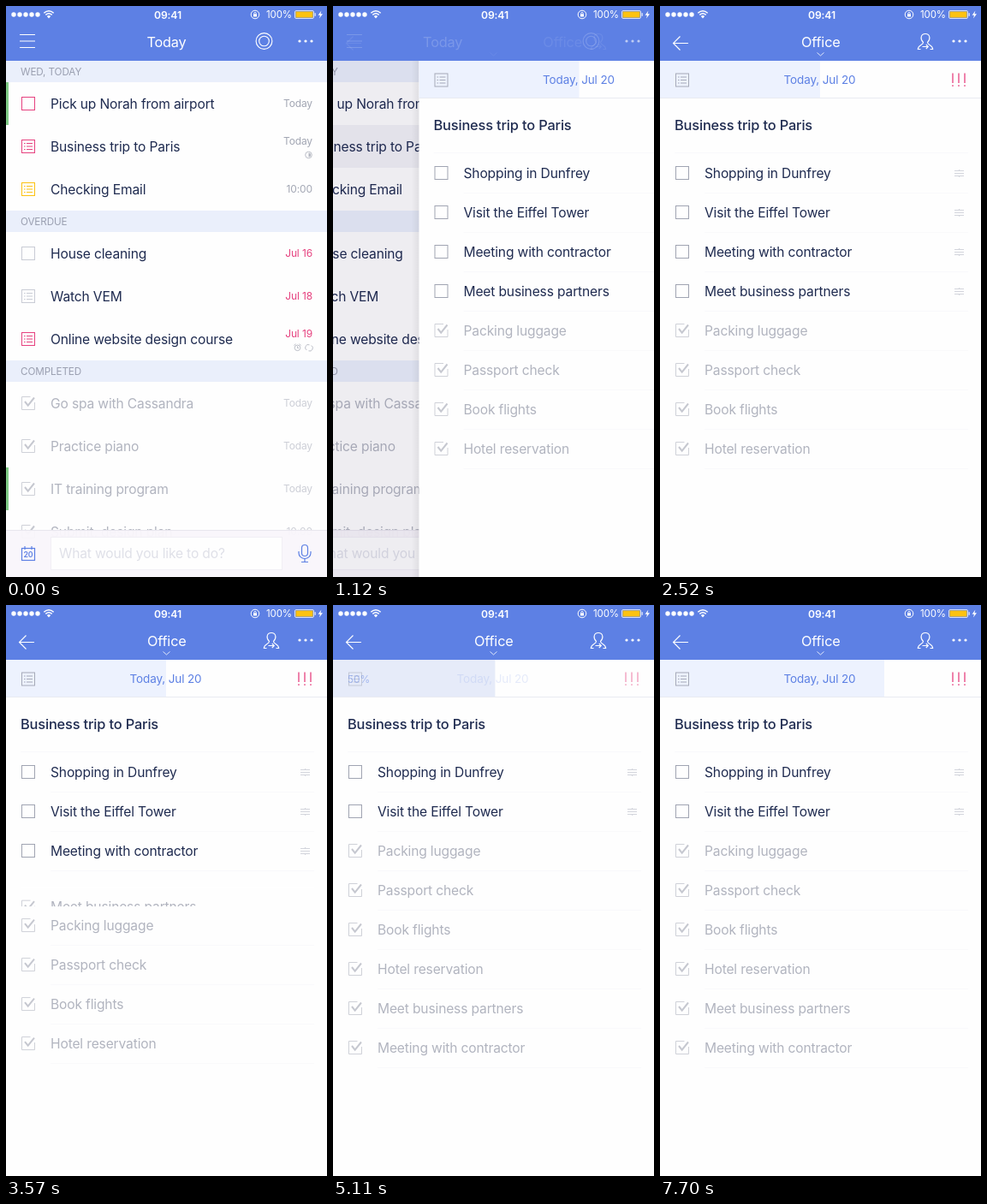
An HTML page that plays this animation: 375x667 px, repeating every 8 s.

```html
<!DOCTYPE html>
<html lang="en">
<head>
<meta charset="utf-8">
<title>To-do list</title>
<style>
html, body { margin: 0; width: 100%; height: 100%; overflow: hidden; background: #fff; }
svg { display: block; width: 100%; height: 100%; }
text { font-family: Inter, Roboto, sans-serif; font-size: 15.6px; letter-spacing: -.01em; white-space: pre; }
</style>
</head>
<body>
<svg id="stage" viewBox="0 0 375 667"></svg>
<script>
const LOOP = 8000;
const BLUE = '#5d80e4', INK = '#1f2b50', GREY = '#b1b4bf', PINK = '#e6417f', GOLD = '#fcc211';

const clamp = v => Math.max(0, Math.min(1, v));
const ramp = (t, from, to) => clamp((t - from) / (to - from));
const smooth = u => u * u * (3 - 2 * u);

// Markup helpers; text is centred vertically on y
const text = (x, y, s, fill = INK, size = 15.6, more = '') =>
  `<text x="${x}" y="${y + size * .36}" fill="${fill}" style="font-size:${size}px" ${more}>${s}</text>`;
const rect = (x, y, w, h, fill, more = '') =>
  `<rect x="${x}" y="${y}" width="${w}" height="${h}" fill="${fill}" ${more}/>`;
const line = (d, color, w = 1, more = '') =>
  `<path d="${d}" fill="none" stroke="${color}" stroke-width="${w}" ${more}/>`;
const dot = (x, y, r, fill) => `<circle cx="${x}" cy="${y}" r="${r}" fill="${fill}"/>`;
const ring = (x, y, r, color, w = 1) =>
  `<circle cx="${x}" cy="${y}" r="${r}" fill="none" stroke="${color}" stroke-width="${w}"/>`;
const END = 'text-anchor="end"', MID = 'text-anchor="middle"';

const box = (y, color) => rect(18.5, y - 7.5, 15, 15, 'none', `stroke="${color}"`);
const listIcon = (y, color) => box(y, color) + [-3.5, 0, 3.5].map(d =>
  line(`M21 ${y + d}h1.6M24 ${y + d}h7`, color)).join('');
const checkIcon = y =>
  line(`M28.5 ${y - 7.5}H18.5V${y + 7.5}H33.5V${y - 1}`, '#cfd1d8') +
  line(`M22 ${y - 2}L25.7 ${y + 2.6}L33 ${y - 6.5}`, '#c6c8d0', 2);

function statusBar() {
  let s = '';
  for (let i = 0; i < 5; i++) s += dot(9 + i * 7, 10, 2.7, '#fff');
  s += line('M44.3 8.2Q50 3.4 55.7 8.2M46.3 10.4Q50 7.2 53.7 10.4', '#fff', 1.5);
  s += `<path d="M50 14.4L47.8 12Q50 10.2 52.2 12Z" fill="#fff"/>`;
  s += text(189, 10.2, '09:41', '#fff', 12.2, MID + ' font-weight="600"');
  s += ring(291, 10, 4.8, '#fff') + rect(289, 9.3, 4, 3.2, '#fff');
  s += line('M289.8 9.4V8.6a1.2 1.2 0 0 1 2.4 0V9.4', '#fff', .8);
  s += text(334, 10.2, '100%', '#fff', 11.5, END);
  s += rect(337.5, 5.5, 22, 9, 'none', 'rx="1.5" stroke="#fff" stroke-opacity=".75"');
  s += rect(338.5, 6.5, 20, 7, GOLD) + rect(360.5, 8.2, 1.4, 3.6, '#fff', 'opacity=".75"');
  return s + '<path d="M368.4 5.5L364.6 10.7H367L366 14.5L370 9.2H367.4Z" fill="#fff"/>';
}

function listRow(y, icon, label, when, done, late) {
  const color = done ? '#cdcfd7' : late ? PINK : '#a2a6b3';
  const dy = /trip|course/.test(label) ? -6 : 0;
  return icon + text(52, y, label, done ? GREY : INK) + text(358, y + dy, when, color, 12, END);
}

function listPage() {
  const section = (y, s) => rect(0, y, 375, 25, '#eaeffb') + text(17, y + 12.8, s, '#9a9fb0', 11.7);
  let s = rect(0, 64, 375, 603, '#fefefe') + rect(0, 139, 375, 50, '#f2f2f6', 'id="press"');
  s += section(64, 'WED, TODAY') + section(239, 'OVERDUE') + section(414, 'COMPLETED');
  s += rect(0, 89, 3, 50, '#7fcb86') + rect(0, 539, 3, 50, '#7fcb86');
  s += listRow(114, box(114, PINK), 'Pick up Norah from airport', 'Today');
  s += listRow(164, listIcon(164, PINK), 'Business trip to Paris', 'Today');
  s += listRow(214, listIcon(214, GOLD), 'Checking Email', '10:00');
  s += listRow(289, box(289, '#c9ccd5'), 'House cleaning', 'Jul 16', false, true);
  s += listRow(339, listIcon(339, '#c9ccd5'), 'Watch VEM', 'Jul 18', false, true);
  s += listRow(389, listIcon(389, PINK), 'Online website design course', 'Jul 19', false, true);
  const done = ['Go spa with Cassandra', 'Practice piano', 'IT training program', 'Submit, design plan'];
  done.forEach((d, i) => {
    const y = 464 + i * 50;
    s += listRow(y, checkIcon(y), d, i < 3 ? 'Today' : '10:00', true);
  });
  // Small badges under the dates
  s += ring(353.5, 174, 3.8, '#b4b7c1', .9) + '<path d="M353.5 171.5a2.5 2.5 0 0 1 0 5z" fill="#b4b7c1"/>';
  s += ring(340.5, 399.3, 3.3, '#b4b7c1', .9) + line('M340.5 397.3V399.5H342M336.5 396.5l2-1.8M344.5 396.5l-2-1.8', '#b4b7c1', .9);
  s += line('M351.3 402A3.5 3.5 0 0 1 354.5 395.8M356.7 396.6A3.5 3.5 0 0 1 353.5 402.8', '#b4b7c1', .9);
  // Entry bar
  s += rect(0, 612, 375, 55, '#f9f6fb', 'opacity=".96"') + rect(0, 612, 375, 1, '#e8e6ee');
  s += rect(52.5, 620.5, 270, 38, '#fefefe', 'stroke="#f1eff5"');
  s += text(62, 639, 'What would you like to do?', '#dfe0e8');
  s += rect(18.5, 633.5, 15, 14, 'none', `stroke="${BLUE}" stroke-width="1.2"`);
  s += line('M22 631v4M30 631v4', BLUE, 1.2) + text(26, 641, '20', BLUE, 8.8, MID + ' font-weight="600"');
  s += rect(345.5, 629.5, 7, 13, 'none', `rx="3.5" stroke="${BLUE}" stroke-width="1.2"`);
  s += line('M342 637v2a7 6.5 0 0 0 14 0v-2M349 645.5v4M345 649.5h8', BLUE, 1.2);
  return s;
}

const tasks = ['Shopping in Dunfrey', 'Visit the Eiffel Tower', 'Meeting with contractor',
  'Meet business partners', 'Packing luggage', 'Passport check', 'Book flights', 'Hotel reservation'];

function taskRow(label, i) {
  const grip = line('M344 -2.5h11M344 .5h11M344 3.5h11', '#d3d5dc') +
    line('M349.5 -4v1M349.5 4v1', '#d3d5dc');
  return `<g id="row${i}">${rect(17, -22, 343, 45, '#fefefe')}${rect(52, 23, 308, 1, '#f9f9fb')}
    <g id="open${i}">${box(0, '#a0a4b2')}${text(52, 0, label)}${grip}</g>
    <g id="done${i}">${checkIcon(0)}${text(52, 0, label, GREY)}</g></g>`;
}

function detailPage() {
  let s = rect(-9, 64, 9, 603, 'url(#edge)', 'id="shade"') + rect(0, 64, 375, 603, '#fefefe');
  s += rect(0, 64, 187, 43, '#edf2fe', 'id="bar"') + rect(0, 64, 187, 43, '#dde2f3', 'id="barDark"');
  s += rect(0, 107, 375, 1, '#e9ebf2');
  s += `<g id="icon">${listIcon(86.5, '#a6aab8')}</g>`;
  s += text(17, 86.3, '50%', BLUE, 12, 'id="percent"');
  s += text(186.5, 86.3, 'Today, Jul 20', BLUE, 13.5, MID + ' id="date"');
  s += `<g id="priority">${[342, 349, 356].map(x =>
    line(`M${x} 78.5V90M${x} 92.3v1.8`, PINK, 1.3)).join('')}</g>`;
  s += text(17, 138.6, 'Business trip to Paris', INK, 16.4, 'font-weight="500"');
  s += rect(17, 171, 343, 1, '#f9f9fb');
  return s + tasks.map(taskRow).join('');
}

function navBar() {
  const oldSet = line('M16 33.5h18M16 41h18M16 48.5h18', '#fff', 1.1) +
    ring(301.5, 41, 9.4, '#fff', 1.1) + ring(301.5, 41, 5.8, '#fff', 1.1);
  const newSet = line('M33 43.5H15.5M23.5 35.5L15.5 43.5L23.5 51.5', '#fff', 1.1) +
    line('M304.5 50.5H301.3C301.5 45 307.5 46 307.5 42.5C303.5 38.5 304.5 32.5 310 32.5' +
      'S316.5 38.5 312.5 42.5C312.5 46 318.5 45 318.7 50.5H315.5' +
      'M306.5 47.5H313.3M310.8 45l2.5 2.5l-2.5 2.5', '#fff', 1.1) +
    line('M183.5 54.5l4 3.5l4 -3.5', '#fff', 1, 'opacity=".8"');
  return rect(0, 0, 375, 64, BLUE) + statusBar() +
    `<g id="oldNav">${oldSet}${text(187.5, 42.3, 'Today', '#fff', 16.3, MID + ' id="oldTitle"')}</g>` +
    `<g id="newNav">${newSet}${text(187.8, 42.3, 'Office', '#fff', 16.3, MID + ' id="newTitle"')}</g>` +
    `<g id="more">${[343, 350, 357].map(x => dot(x, 41, 1.6, '#fff')).join('')}</g>`;
}

document.getElementById('stage').innerHTML =
  `<defs><linearGradient id="edge"><stop offset="0" stop-opacity="0"/><stop offset="1" stop-opacity=".06"/></linearGradient></defs>
  <g id="list">${listPage()}</g>${rect(0, 64, 375, 603, '#180e40', 'id="dim"')}
  <g id="detail">${detailPage()}</g>${navBar()}`;

const el = id => document.getElementById(id);
const set = (id, name, value) => el(id).setAttribute(name, value);
const fade = (id, value) => set(id, 'opacity', value);
const shift = (id, x, y = 0) => set(id, 'transform', `translate(${x} ${y})`);

// Critically damped push: fraction of the way still to go
function pushLeft(t) {
  const k = Math.max(0, t - 988.5) * .0196;
  return t >= 1680 ? 0 : (1 + k) * Math.exp(-k);
}

function draw(t) {
  const rest = pushLeft(t), p = 1 - rest;
  shift('list', -112.5 * p);
  shift('detail', 375 * rest);
  fade('dim', .09 * p);
  fade('press', t >= 910 ? 1 : 0);
  fade('shade', rest > 0 && rest < 1 ? 1 : 0);
  fade('oldNav', rest ** 1.3);
  fade('newNav', p ** 8);
  fade('more', 1 - 2 * p * rest);
  shift('oldTitle', -81 * p);
  shift('newTitle', 300 * rest);

  // Two tasks are ticked and sink to the end
  const a = smooth(ramp(t, 3500, 3850)), b = smooth(ramp(t, 4200, 4480));
  tasks.forEach((_, i) => {
    const slot = i < 2 ? i : i === 2 ? 2 + 5 * b : i === 3 ? 3 + 4 * a - b : i - a - b;
    const done = i > 3 || (i === 3 && t >= 3360) || (i === 2 && t >= 4130);
    shift('row' + i, 0, 195 + 46 * slot);
    fade('open' + i, done ? 0 : 1);
    fade('done' + i, done ? 1 : 0);
  });

  // Progress is dragged from 50% to 70%
  const hold = ramp(t, 4980, 5260) - ramp(t, 6720, 7000);
  const share = .5 + .2 * smooth(ramp(t, 4980, 6230));
  set('bar', 'width', 375 * share - .5);
  set('barDark', 'width', 375 * share - .5);
  fade('barDark', hold);
  fade('icon', 1 - hold);
  fade('priority', 1 - hold);
  fade('date', (1 - hold) ** 3);
  fade('percent', hold);
  el('percent').textContent = Math.floor(share * 100 + 1e-6) + '%';
}

function tick() {
  draw(performance.now() % LOOP);
  requestAnimationFrame(tick);
}
tick();
</script>
</body>
</html>
```
